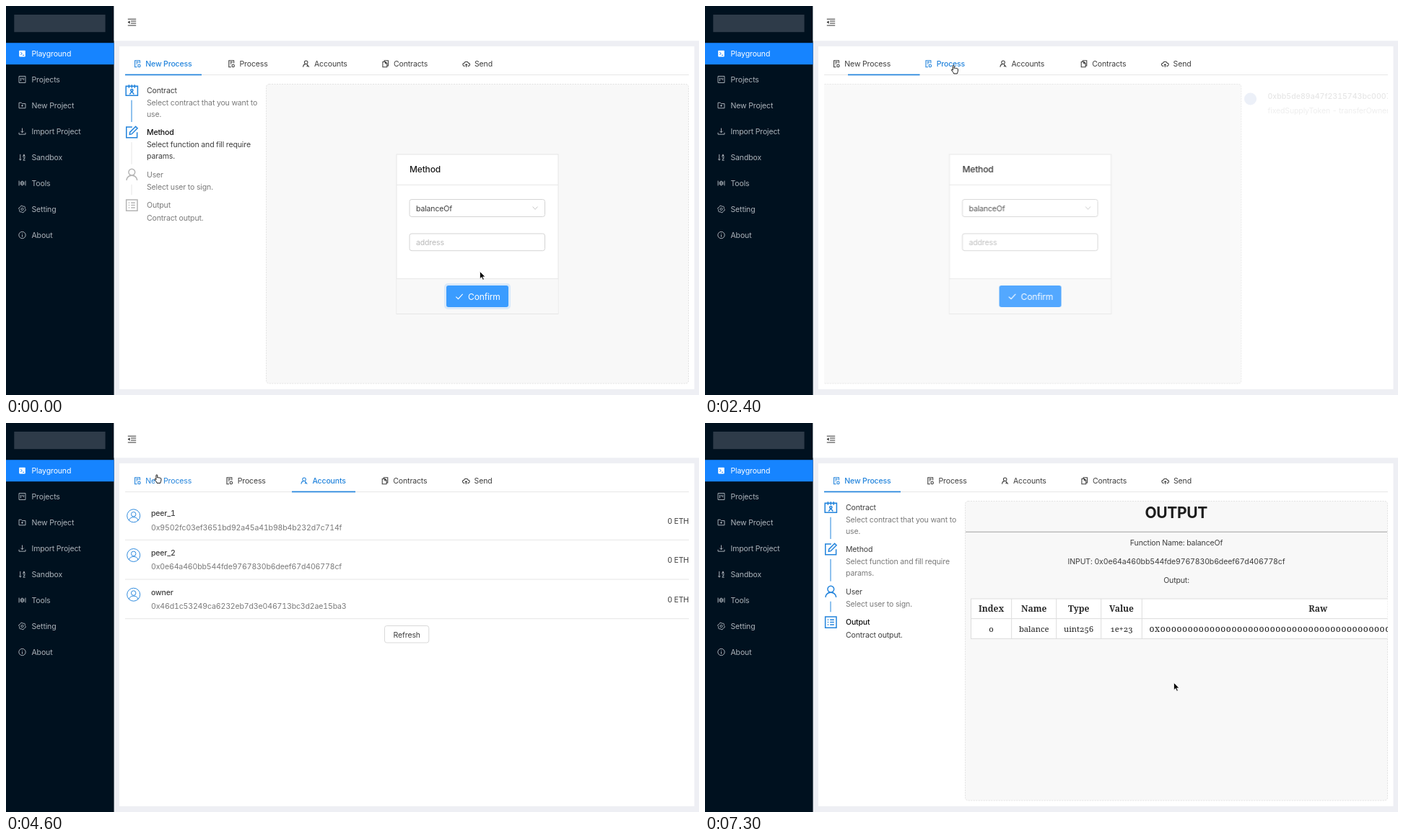
Write an HTML page that moves like this. It is 960 by 540 pixels and loops after 7.4 s.

```html
<!DOCTYPE html>
<html lang="en">
<head>
<meta charset="utf-8">
<title>Playground</title>
<style>
  html, body { margin: 0; width: 100%; height: 100%; overflow: hidden; background: #eeeff4; }
  svg { display: block; width: 960px; height: 540px; }
  text { font: 10.5px Inter, "Open Sans", sans-serif; font-variant-numeric: tabular-nums; letter-spacing: -.13px; white-space: pre; }
  .hex { letter-spacing: -.12px; }
  .hash { font-weight: 550; letter-spacing: .05px; }
  .mid { font-weight: 550; letter-spacing: -.16px; }
  .big { font-size: 12px; }
  .h1 { font-size: 21px; font-weight: 700; letter-spacing: -.35px; }
  .cell, .head, .raw { font-family: "Noto Serif", serif; font-variant-numeric: oldstyle-nums; letter-spacing: 0; }
  .cell { font-size: 11.2px; }
  .head { font-size: 12px; font-weight: 700; }
  .raw { font-size: 12px; letter-spacing: .65px; }
</style>
</head>
<body>
<svg id="stage" viewBox="0 0 960 540"></svg>
<script>
const LOOP = 7400, STEP = 100;
const BLUE = '#1684ff', HOVER = '#3a9cff', LINK = '#2384dc', INK = '#3e3e3e', DARK = '#1c1c1c', GRAY = '#7a7a7a', LINE = '#e6e6e6';
const stage = document.getElementById('stage');
const $ = id => document.getElementById(id);

// Icons live in a 16 x 16 box.
const disc = (x, y, r) => `M${x - r} ${y}a${r} ${r} 0 1 0 ${2 * r} 0a${r} ${r} 0 1 0 ${-2 * r} 0z`;
const box = (x, y, w, h) => `M${x} ${y}h${w}v${h}h${-w}z`;
const gear = Array.from({ length: 24 }, (_, i) => {
  const a = (i + .5) * Math.PI / 12, r = (i >> 1) % 2 ? 5.9 : 7.1;
  return (i ? 'L' : 'M') + (8 + r * Math.cos(a)).toFixed(1) + ' ' + (8 + r * Math.sin(a)).toFixed(1);
}).join('') + 'z';
const ICONS = {
  project: box(1.5, 1.5, 13, 13) + 'M5 4.5v7M8 4.5v3.5M11 4.5v5',
  folder: 'M1.5 13.5v-11h4.5l2 2h6.5v9zM8 6.5v4M6 8.5h4',
  load: 'M8 1.5v9M5 7.5l3 3 3-3M1.5 10.5v3.5h13v-3.5',
  sort: 'M4 2v12M2 11.5l2 2.5 2-2.5M9.5 7l2-5 2 5M10 5.5h3M10 9h3.5l-3.5 5h4',
  tools: 'M1.5 3v10M4.5 5v6M6.6 4h2.8v8h-2.8zM11.5 5v6M14.5 3v10',
  gear: gear + disc(8, 8, 2.3),
  info: disc(8, 8, 6.8) + 'M8 7v4.8M8 4.2v1.3',
  doc: 'M13 7v-5.5h-10v13h4.5M5.5 4.5h5M5.5 7.5h3' + disc(11.6, 11.8, 2.5),
  people: disc(8, 5, 3.3) + 'M2 14.5c0-3.4 2-5.4 4.6-6M9.4 8.4l4.6 6.1M9 12.5h3',
  copy: 'M5.5 3.2v-1.7h8v10.5h-2M2.5 3.8h5.5l3 3v7.7h-8.5zM7.5 4v3.2h3.5',
  cloud: 'M5 12.5h-.8a3 3 0 0 1-.4-6 4.5 4.5 0 0 1 8.5 0 3 3 0 0 1-.5 6h-.8M8 15v-6.5M6 10.5l2-2 2 2',
  contract: box(.8, 3, 14.4, 11.5) + 'M4.5 1v4M11.5 1v4M8 1v4' + disc(8, 8, 1.4) + 'M5.3 13l2.7-3.5 2.7 3.5',
  edit: 'M14.5 8v6.7h-13.2v-13.2h7.2M5.3 10.7l.4-2.8 7-7 2.2 2.2-7 7z',
  user: disc(8, 5, 3.9) + 'M1.5 15.2c0-3.6 3-6.2 6.5-6.2s6.5 2.6 6.5 6.2',
  list: box(1.2, 1.2, 13.6, 13.6) + 'M4 5h1.2M7 5h5M4 8h1.2M7 8h5M4 11h1.2M7 11h5',
  face: disc(8, 8, 7.2) + disc(8, 6.3, 2.6) + 'M3 13.2c.6-2.6 2.2-3.6 5-3.6s4.4 1 5 3.6',
  grid: box(1, 1, 5.8, 5.8) + box(9.2, 1, 5.8, 5.8) + box(1, 9.2, 5.8, 5.8) + box(9.2, 9.2, 5.8, 5.8),
  check: 'M1.2 8.5l4.6 4.6 9-10',
  down: 'M2 4.5l6 6.8 6-6.8'
};
const icon = (name, x, y, size, color, width = 1.4) =>
  `<path d="${ICONS[name]}" transform="translate(${x - size / 2} ${y - size / 2}) scale(${size / 16})" fill="none" stroke="${color}" stroke-width="${width}"/>`;
const rect = (x, y, w, h, fill, more = '') => `<rect x="${x}" y="${y}" width="${w}" height="${h}" fill="${fill}" ${more}/>`;
const line = (x1, y1, x2, y2, color = LINE, more = '') => `<path d="M${x1} ${y1}L${x2} ${y2}" stroke="${color}" ${more}/>`;
// y is the middle of the line of text
const text = (s, x, y, color, cls = '', anchor = 'start', id = '') =>
  `<text x="${x}" y="${y + 3.8}" fill="${color}" class="${cls}" text-anchor="${anchor}"${id && ` id="${id}"`}>${s}</text>`;
const center = (s, x, y, color, cls) => text(s, x, y, color, cls, 'middle');

const HOLDER = '0x0e64a460bb544fde9767830b6deef67d406778cf';

const MENU = [['Playground'], ['Projects', 'project'], ['New Project', 'folder'], ['Import Project', 'load'],
  ['Sandbox', 'sort'], ['Tools', 'tools'], ['Setting', 'gear'], ['About', 'info']];

// label, icon, text x, shift when another tab than the first is active, underline x, underline width
const TABS = [
  ['New Process', 'doc', 193.3, 0, 165, 106],
  ['Process', 'doc', 323.5, -2.8, 292.3, 81],
  ['Accounts', 'people', 427, -2.6, 396, 88],
  ['Contracts', 'copy', 537, -.7, 508, 88],
  ['Send', 'cloud', 649, -.4, 620, 66]
];

const STEPS = [
  ['Contract', 'contract', 117, ['Select contract that you want to', 'use.']],
  ['Method', 'edit', 175.3, ['Select function and fill require', 'params.']],
  ['User', 'user', 234, ['Select user to sign.']],
  ['Output', 'list', 276.6, ['Contract output.']]
];

const ACCOUNTS = [
  ['peer_1', '0x9502fc03ef3651bd92a45a41b98b4b232d7c714f'],
  ['peer_2', HOLDER],
  ['owner', '0x46d1c53249ca6232eb7d3e046713bc3d2ae15ba3']
];

function sidebar() {
  const items = MENU.map(([label, name], i) => {
    const y = 66 + 36 * i, color = i ? '#adb4bb' : '#fff';
    const mark = i ? icon(name, 22.5, y, 11, color)
      : rect(18.2, 61.8, 8.6, 8.6, '#fff', 'rx=".8"') + `<path d="M20.3 64l2 2-2 2M23 68.3h2.2" fill="none" stroke="${BLUE}"/>`;
    return mark + text(label, 35.5, y, color);
  });
  return rect(0, 0, 149.6, 540, '#00111f') + rect(11.3, 12, 126.3, 24.2, '#2e3b49') + rect(0, 51.2, 149.6, 30, BLUE) + items.join('');
}

function header() {
  return rect(149.6, 0, 811, 48.3, '#fff') + rect(157, 56, 796.5, 476, '#fff') +
    `<path d="M168.8 18.2h11.4M173 21h7.2M173 24h7.2M168.8 27h11.4" stroke="#333"/><path d="M171.6 20.3v4.4l-3-2.2z" fill="#333"/>`;
}

function steps(active) {
  return STEPS.map(([title, name, y, lines], i) => {
    const on = i === active, next = STEPS[i + 1];
    return icon(name, 174.3, y, 18, i <= active ? LINK : '#b5b5b5', 1.35) +
      text(title, 195, y, on ? '#111' : i < active ? INK : GRAY, on ? 'mid' : '') +
      lines.map((s, k) => text(s, 195, y + 17.3 + 16 * k, on ? INK : GRAY)).join('') +
      (next ? line(174, y + 13.7, 174, next[2] - 14.3, i < active ? LINK : LINE) : '');
  }).join('');
}

function methodCard() {
  return rect(541, 206, 224, 221.5, '#fff', `stroke="${LINE}"`) + rect(541.5, 379, 223, 48, '#f8f8f8') +
    line(541, 248.3, 765, 248.3) + line(541, 378.7, 765, 378.7) + text('Method', 559, 227.5, DARK, 'mid big') +
    rect(559, 268.5, 187.5, 24, '#fff', 'rx="3" id="select"') + text('balanceOf', 568, 281, INK) + icon('down', 733, 280.5, 9, '#b8b8b8') +
    rect(559, 316, 187.5, 23.7, '#fff', 'rx="3" id="input"') +
    `<g clip-path="url(#field)">${text('', 568, 328, INK, '', 'start', 'address')}</g>` +
    rect(607, 385, 92, 36, HOVER, 'rx="5" id="glow"') + rect(610, 388, 86, 30, BLUE, 'rx="3" id="button"') +
    icon('check', 628, 403.2, 11, '#fff', 1.6) + text('Confirm', 640, 403.8, '#fff', 'big');
}

function output() {
  const cols = [368.5, 424.7, 486.7, 548.7, 605.3];
  const head = ['Index', 'Name', 'Type', 'Value'], row = ['0', 'balance', 'uint256', '1e+23'];
  const mid = i => (cols[i] + cols[i + 1]) / 2;
  return center('OUTPUT', 652.7, 128.2, DARK, 'h1') + line(361, 151.2, 945, 151.2, '#a0a0a0') +
    center('Function Name: balanceOf', 653, 166, INK) + center('INPUT: ' + HOLDER, 653, 192, INK, 'hex') + center('Output:', 653, 218, INK) +
    rect(368.5, 244, 577, 55.5, '#fff') + [244, 271.6, 299.4].map(y => line(368, y, 945.5, y, '#ddd')).join('') +
    cols.map(x => line(x, 244, x, 299.4, '#ddd')).join('') +
    head.map((s, i) => center(s, mid(i), 257.8, '#2a2a2a', 'head')).join('') + center('Raw', 849.3, 257.8, '#2a2a2a', 'head') +
    row.map((s, i) => center(s, mid(i), 285.7, '#222', 'cell')).join('') +
    text('0x' + '0'.repeat(50), 615.5, 285.7, '#222', 'raw');
}

const newProcess = () => rect(360.5, 108.5, 585, 415.5, '#f8f8f8', 'rx="4" stroke="#e2e2e2" stroke-dasharray="2 1.5"') +
  `<g id="form">${steps(1)}${methodCard()}</g><g id="result">${steps(3)}${output()}</g>`;

const process = () => '<circle cx="177" cy="129" r="8.5" fill="#6685c4"/>' +
  text('0xbb5de89a47f2315743bc0007305c98537bd55c81c845ab0b4204186f7d08ff87', 201, 125.3, INK, 'hash') +
  text('fixedSupplyToken - transferOwnership', 201, 145, GRAY) +
  '<path id="spin" d="M888 129.8a5.6 5.6 0 0 1 5.6 5.6" fill="none" stroke="#666"/>' + icon('grid', 934.5, 135, 9.5, LINK, 1.7);

const accounts = () => ACCOUNTS.map(([name, hex], i) => {
  const y = 125.3 + 54.7 * i;
  return icon('face', 176.7, y + 3.5, 20, LINK, .75) + text(name, 201, y, INK, 'mid') + text(hex, 201, y + 19.4, GRAY, 'hex') +
    text('0 ETH', 946, y + 10.4, INK, '', 'end') + line(165, y + 37, 946, y + 37);
}).join('') + rect(524.5, 281.5, 61.3, 23.5, '#fff', 'rx="3" stroke="#d9d9d9"') + center('Refresh', 555.2, 293.8, INK);

const tabs = () => line(165, 95.6, 946, 95.6) + rect(0, 94.6, 10, 1.7, LINK, 'id="ink"') +
  TABS.map(([label, name, x], i) => `<g id="tab${i}">${icon(name, x - 11.3, 80.3, 11, 'currentColor', 1.55)}${text(label, x, 80.3, INK)}</g>`).join('');

const cursors = () => `<g id="cursor">
  <path id="arrow" d="M0 0v10.2l2.4-2.2 1.7 3.8 1.7-.7-1.7-3.7h3.2z" fill="#000" stroke="#fff" stroke-width=".7"/>
  <path id="hand" d="M-1.6 1c0-1.3 1.9-1.3 1.9 0v3.2c.3-.8 1.7-.7 1.8.2.4-.7 1.6-.5 1.7.3.5-.5 1.6-.2 1.6.7v2.6c0 1.6-1 2.2-1.1 3.6h-4.6c-.5-1.9-2.6-3.6-3.2-5-.4-1 .8-1.5 1.9.2z" fill="#fff" stroke="#000" stroke-width=".9"/>
  <path id="beam" d="M-2.4 -5.5q2.4 0 2.4 1.2q0 -1.2 2.4 -1.2M0 -4.5v9M-2.4 5.5q2.4 0 2.4 -1.2q0 1.2 2.4 1.2M-1.2 1.8h2.4" fill="none" stroke="#222"/>
</g>`;

stage.innerHTML = `<defs><clipPath id="page"><path d="${box(165, 97, 781, 430)}"/></clipPath>
  <clipPath id="field"><path d="${box(566, 317, 172.5, 22)}"/></clipPath></defs>` +
  rect(0, 0, 960, 540, '#eeeff4') + sidebar() + header() + tabs() +
  `<g clip-path="url(#page)">${[newProcess, process, accounts].map((view, i) => `<g id="view${i}">${view()}</g>`).join('')}</g>` + cursors();

// time, x, y
const PATH = [
  [0, 656.5, 368.5], [1200, 656.5, 368.5], [1600, 440, 118], [1800, 363.5, 46.5], [1900, 363.5, 46.5], [2150, 345, 80], [2600, 345, 84],
  [2700, 390, 90], [2800, 436.5, 88], [3100, 437, 86], [3500, 330, 199], [4150, 330, 199], [4500, 212, 74],
  [4600, 209.5, 71.8], [4800, 209.5, 71.8], [5000, 600, 280], [5200, 603, 322], [5700, 603, 326],
  [6100, 671, 397], [6500, 671, 397], [6900, 649.5, 360.5], [LOOP, 649.5, 360.5]
];
const SWITCHES = [[-999, 0], [2300, 1], [3000, 2], [4700, 0]];
const FOCUS = 5400, PASTE = 5600, CLICK = 6200, DONE = 6600;

const clamp = v => Math.max(0, Math.min(1, v));
const ease = v => v * v * (3 - 2 * v);
const mix = (a, b, k) => a + (b - a) * k;
const within = ([x, y], l, t, w, h) => x >= l && x <= l + w && y >= t && y <= t + h;
const onSelect = p => within(p, 559, 268, 188, 25);
const onButton = p => within(p, 610, 388, 86, 30);
const tabUnder = p => TABS.findIndex(tab => within(p, tab[4], 66, tab[5], 29));

function pointer(t) {
  const i = Math.max(1, PATH.findIndex(p => p[0] >= t));
  const [a, b] = [PATH[i - 1], PATH[i]], k = ease(clamp((t - a[0]) / (b[0] - a[0])));
  return [mix(a[1], b[1], k), mix(a[2], b[2], k)];
}

const set = (id, attrs) => { for (const k in attrs) $(id).setAttribute(k, attrs[k]); };
const show = (id, on) => set(id, { display: on ? 'inline' : 'none' });

function draw(t) {
  const at = pointer(t), before = pointer(Math.max(0, t - 100)), earlier = pointer(Math.max(0, t - 200));
  const n = SWITCHES.filter(s => s[0] <= t).length - 1;
  const [since, active] = SWITCHES[n], last = n ? SWITCHES[n - 1][1] : active;
  const slide = ease(clamp((t - since) / 300)), fade = ease(clamp((t - since) / 450));
  const done = t >= DONE, form = active === 0 && !done;

  for (let i = 0; i < 3; i++) {
    show('view' + i, i === active || (i === last && fade < 1));
    set('view' + i, { opacity: i === active ? fade : 1 - fade, transform: `translate(${(i - mix(last, active, slide)) * 781} 0)` });
  }
  set('ink', { x: mix(TABS[last][4], TABS[active][4], slide), width: mix(TABS[last][5], TABS[active][5], slide) });

  const tab = tabUnder(at);
  TABS.forEach((row, i) => {
    const hot = i === active || i === tab;
    const label = $('tab' + i).lastChild;
    set('tab' + i, { color: hot ? LINK : INK, transform: `translate(${active ? row[3] : 0} 0)` });
    label.setAttribute('fill', !hot ? INK : i === active || tabUnder(before) === i ? LINK : '#2b4f7d');
    label.setAttribute('class', i === active ? 'mid' : '');
  });

  show('form', !done);
  show('result', done);
  const pasted = t >= PASTE, focused = t >= FOCUS && t < CLICK;
  set('select', { stroke: onSelect(at) || onSelect(earlier) ? '#5aa9ea' : '#d4d4d4' });
  set('input', { stroke: focused ? '#5aa9ea' : '#d4d4d4' });
  $('address').textContent = pasted ? HOLDER : 'address';
  set('address', { fill: pasted ? INK : '#b9b9b9', class: pasted ? 'hex' : '' });
  set('button', { fill: t < 3000 ? HOVER : onButton(at) ? '#2a90ff' : BLUE });
  const age = t < 3000 ? t + 250 : t - CLICK;
  set('glow', { opacity: age < 0 ? 0 : .2 * (1 - clamp(age / 1100)) });

  set('spin', { transform: `rotate(${(t - 2800) * .36} 888 135.4)` });

  const beam = form ? within(at, 559, 316, 188, 24) : active === 2 && within(at, 201, 193, 264, 13);
  const hand = tab >= 0 || (form && (onSelect(at) || onButton(at)));
  show('beam', beam);
  show('hand', hand);
  show('arrow', !beam && !hand);
  set('cursor', { transform: `translate(${at[0]} ${at[1]})` });
}

const start = performance.now();
function tick() {
  const t = (performance.now() - start) % LOOP;
  draw(Math.floor(t / STEP) * STEP);
  requestAnimationFrame(tick);
}
tick();
</script>
</body>
</html>
```
